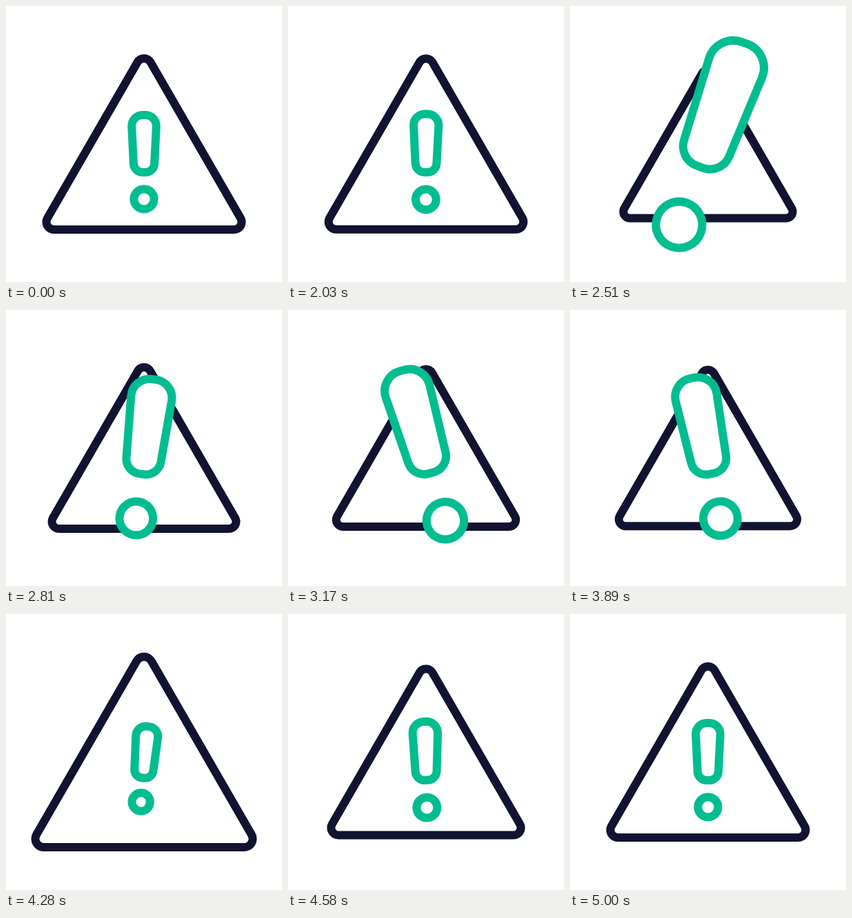
Write an HTML page with a canvas that moves like this. It is 400 by 400 pixels and loops after 5030 ms.

```html
<!DOCTYPE html>
<html lang="en">
<head>
<meta charset="utf-8">
<title>Warning</title>
<style>
  html, body { margin: 0; width: 100%; height: 100%; overflow: hidden; background: #fff; }
  canvas { display: block; }
</style>
</head>
<body>
<canvas id="stage" width="400" height="400"></canvas>
<script>
const ctx = document.getElementById('stage').getContext('2d');
const LOOP = 5030, STEP = 30;
const NAVY = '#121331', GREEN = '#00bd90';

// Beats of the motion, in ms
const RISE = 2000, PEAK = 2415, DIP = 2896, PEAK2 = 3600, RECOIL = 4220, REST = 4960;

// Eased progress from 0 to 1 between two times
function move(t, from, to) {
  const p = Math.min(1, Math.max(0, (t - from) / (to - from)));
  return (1 - Math.cos(Math.PI * p)) / 2;
}

// Two pulses with a partial dip between them; the second one ends at RECOIL
function swell(t, dip, fall) {
  return move(t, RISE, PEAK)
    - dip * (move(t, PEAK, DIP) - move(t, DIP, PEAK2))
    - move(t, fall, RECOIL);
}

// Overshoot that builds up during the fall, then rings out
function recoil(t, fall) {
  if (t < RECOIL) return move(t, fall, RECOIL);
  return Math.cos(Math.PI * (t - RECOIL) / 450) * (1 - move(t, RECOIL, REST)) ** 2;
}

// Swing right, then left, then back past upright
function swing(t, fall) {
  return 20 * move(t, RISE, 2470) - 41 * move(t, 2470, 3370)
    + 21 * move(t, fall, RECOIL) + 5.8 * recoil(t, fall);
}

// Closed outline symmetrical about x = 0, from its right corners [x, y, radius]
function roundedPath(top, bottom) {
  const mirror = ([x, y, r]) => [-x, y, r];
  const corners = [top, bottom, mirror(bottom), mirror(top)];
  ctx.moveTo(0, top[1]);
  corners.forEach(([x, y, r], i) => {
    const [nextX, nextY] = i < 3 ? corners[i + 1] : [0, top[1]];
    ctx.arcTo(x, y, nextX, nextY, r);
  });
  ctx.closePath();
}

function trianglePath() {
  const r = 11, apex = -113, base = 113, half = 130.5, tilt = Math.PI / 6;
  ctx.arc(0, apex, r, Math.PI + tilt, -tilt);
  ctx.arc(half, base, r, -tilt, Math.PI / 2);
  ctx.arc(-half, base, r, Math.PI / 2, Math.PI + tilt);
  ctx.closePath();
}

// The path is transformed, the line weight is not
function draw(color, y, angle, scale, path) {
  ctx.save();
  ctx.translate(200, y);
  ctx.rotate(angle * Math.PI / 180);
  ctx.scale(scale, scale);
  ctx.beginPath();
  path();
  ctx.restore();
  ctx.fillStyle = '#fff';
  ctx.strokeStyle = color;
  ctx.lineWidth = 12;
  ctx.fill();
  ctx.stroke();
}

function render(t) {
  const frame = 1 - .142 * swell(t, .65, 3750) + .128 * recoil(t, 3750);
  const mark = 1 + 1.37 * swell(t, .556, PEAK2) - .11 * recoil(t, PEAK2);
  const angle = swing(t, 3660);
  const y = 226 - 19.5 * Math.abs(mark - 1);

  ctx.fillStyle = '#fff';
  ctx.fillRect(0, 0, 400, 400);
  draw(NAVY, 200, 0, frame, trianglePath);
  draw(GREEN, y, angle, mark, () => roundedPath([18.6, -68, 16], [14.5, 15, 13]));
  draw(GREEN, y, angle, mark, () => ctx.arc(0, 53.8, 14.6, 0, 2 * Math.PI));
}

function tick() {
  const t = performance.now() % LOOP - RISE;
  render(RISE + Math.floor(t / STEP) * STEP);
  requestAnimationFrame(tick);
}
tick();
</script>
</body>
</html>
```
